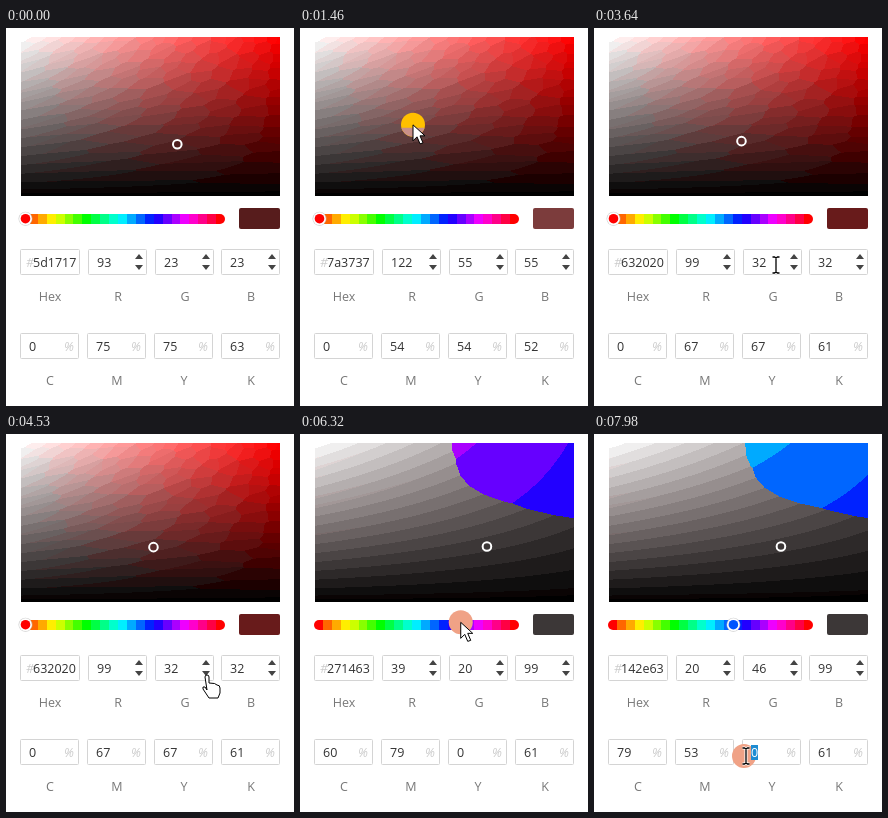
An HTML page with a canvas that plays this animation: 288x378 px, repeating every 8 s.

```html
<!DOCTYPE html>
<html lang="en">
<head>
<meta charset="utf-8">
<title>Colour picker</title>
<style>
html, body { margin: 0; width: 100%; height: 100%; overflow: hidden; background: #fff; }
canvas { position: absolute; left: 15px; top: 9px; }
svg { position: absolute; left: 0; top: 0; }
text { font: 12.5px "Open Sans", "Noto Sans", sans-serif; fill: #333; }
.label { fill: #777; text-anchor: middle; }
.unit { fill: #ccc; font-style: italic; }
</style>
</head>
<body>
<canvas id="area" width="259" height="159"></canvas>
<svg id="stage" width="288" height="378" viewBox="0 0 288 378"></svg>
<script>
(() => {
const LOOP = 8000, STEP = 70, BARS = 23;
const stage = document.getElementById('stage');
const ctx = document.getElementById('area').getContext('2d');

function set(el, attrs) {
  for (const k in attrs) el.setAttribute(k, attrs[k]);
}
function add(tag, attrs, parent = stage) {
  const el = document.createElementNS('http://www.w3.org/2000/svg', tag);
  set(el, attrs);
  parent.append(el);
  return el;
}
function label(x, y, str, cls = '') {
  const el = add('text', { x, y, class: cls });
  el.textContent = str;
  return el;
}
const css = c => `rgb(${c.map(Math.round)})`;
const show = (el, on) => set(el, { visibility: on ? 'visible' : 'hidden' });

// Colour with the given hue whose channels span lo..hi
function hueColor(h, lo = 0, hi = 255) {
  return [5, 3, 1].map(n => {
    const k = (n + h / 60) % 6;
    return hi - (hi - lo) * Math.max(0, Math.min(k, 4 - k, 1));
  });
}
function hueOf([r, g, b]) {
  const hi = Math.max(r, g, b), d = hi - Math.min(r, g, b) || 1;
  const h = hi === r ? (g - b) / d : hi === g ? 2 + (b - r) / d : 4 + (r - g) / d;
  return (h * 60 + 360) % 360;
}

// Limited palette: reds, warm greys and the strip colours; the last number weighs distance
let seed = 7;
const rand = () => (seed = seed * 16807 % 2147483647) / 2147483647;
const barColors = Array.from({ length: BARS }, (_, i) => hueColor(i && 8 + 16 * i));
const palette = [...barColors, [38, 236, 196]].map(c => [...c, 1]);
for (let r = 0; r <= 255; r += 15) {
  const warm = r - 8 * Math.sin(Math.PI * r / 255);
  palette.push([r, warm, warm, 1.44]);
  for (let g = 0; g < r; g += 15) {
    const v = Math.min(255, r + rand() * 10 - 5), w = Math.max(0, g + rand() * 10 - 5);
    palette.push([v, w, w, 1.44]);
  }
}

function nearest(r, g, b) {
  let best = null, min = Infinity;
  for (const p of palette) {
    const x = p[0] - r, y = p[1] - g, z = p[2] - b;
    const d = (x * x + y * y + z * z) * p[3];
    if (d < min) { min = d; best = p; }
  }
  return best;
}

let paintedHue = -1;
function paintArea(hue) {
  hue = Math.round(hue) % 360;
  if (hue === paintedHue) return;
  paintedHue = hue;
  const img = ctx.createImageData(259, 159), [r, g, b] = hueColor(hue);
  for (let y = 0, i = 0; y < 159; y++) {
    const v = 1 - y / 158;
    for (let x = 0; x < 259; x++, i += 4) {
      const s = x / 258, mix = c => (255 + (c - 255) * s) * v;
      const p = nearest(mix(r), mix(g), mix(b));
      img.data[i] = p[0];
      img.data[i + 1] = p[1];
      img.data[i + 2] = p[2];
      img.data[i + 3] = 255;
    }
  }
  ctx.putImageData(img, 0, 0);
}

// Static layout
const clip = add('clipPath', { id: 'strip' });
add('rect', { x: 14, y: 186, width: 205, height: 10, rx: 5 }, clip);
const strip = add('g', { 'clip-path': 'url(#strip)', 'shape-rendering': 'crispEdges' });
barColors.forEach((c, i) => {
  const width = 205 / BARS;
  add('rect', { x: 14 + i * width, y: 186, width, height: 10, fill: css(c) }, strip);
});
const swatch = add('rect', { x: 233, y: 180, width: 41, height: 21, rx: 2 });

const fieldX = [14, 82, 149, 215];
const values = [];
function field(x, y, width, name, textX) {
  add('rect', { x: x + .5, y: y + .5, width: width - 1, height: 25, rx: 1, fill: '#fff', stroke: '#d4d4d4' });
  label(x + 30, y + 52, name, 'label');
  values.push(label(textX, y + 18, ''));
}
['Hex', 'R', 'G', 'B'].forEach((name, i) => {
  const x = fieldX[i];
  field(x, 221, i ? 59 : 60, name, i ? x + 9 : 27);
  if (!i) return label(20, 239, '#', 'unit');
  add('path', { d: `M${x + 47} 231h8l-4-5zm0 6h8l-4 5z`, fill: '#444' });
});
['C', 'M', 'Y', 'K'].forEach((name, i) => {
  const x = 14 + 67 * i;
  field(x, 305, 59, name, x + 9);
  label(x + 44, 323, '%', 'unit');
});

// Moving parts
const ring = add('circle', { r: 4.3, fill: 'none', stroke: '#fff', 'stroke-width': 2 });
const thumb = add('g', {});
add('circle', { r: 7, fill: '#bbb', opacity: .7 }, thumb);
add('circle', { r: 6.4, fill: '#fff' }, thumb);
const thumbDot = add('circle', { r: 4.8 }, thumb);

const press = add('g', {});
const disc = add('circle', { r: 12 }, press);
const discLow = add('path', { d: 'M-11.6 3A12 12 0 0 0 11.6 3z', fill: '#c8908a' }, press);
const hot = add('rect', { x: -7, y: -7, width: 10, height: 10, fill: '#788888' }, press);
const selection = add('g', {});
add('rect', { x: 157, y: 311, width: 7, height: 15, fill: '#1e8cd2' }, selection);
add('text', { x: 157, y: 323, style: 'fill:#fff' }, selection).textContent = '0';

const outline = { fill: '#fff', stroke: '#000', 'stroke-linejoin': 'round' };
const pointer = add('g', {});
const beam = add('g', { fill: 'none' }, pointer);
for (const [stroke, width] of [['#fff', 3], ['#000', 1.3]]) {
  add('path', { d: 'M-3.5-8h2l1.5 1 1.5-1h2M0-7V7M-3.5 8h2l1.5-1 1.5 1h2', stroke, 'stroke-width': width }, beam);
}
const cursors = {
  arrow: add('path', { d: 'M0 0V16l4-4 3 7 3-1-3-7h5z', ...outline }, pointer),
  hand: add('path', { d: 'M-2 2q0-2 2-2t2 2v6q7 0 8 2 3 0 3 3v5l-2 5h-9l-6-9q-1-3 2-2l2 3z', ...outline }, pointer),
  beam
};

// Motion: cursor [time, x, y], dragged colour [time, red, green], button [down, up]
const path = [[130, 190, 306], [480, 171, 117], [900, 85, 66], [1880, 134, 120], [2090, 136, 214],
  [2300, 133, 229], [3520, 133, 229], [3630, 182, 237], [3850, 201, 241], [5620, 201, 241],
  [5910, 207, 190], [6600, 123, 187], [6850, 123, 187], [7150, 141.1, 187], [7450, 165, 362],
  [7970, 152, 322]];
const dragged = [[480, 93, 23], [900, 168, 86], [1880, 88, 32]];
const presses = [[480, 1880], [2480, 3530], [4500, 5640], [5960, 7150], [7960, LOOP]];

function at(keys, t) {
  const i = keys.findIndex(k => k[0] > t);
  if (i < 0) return keys[keys.length - 1].slice(1);
  if (!i) return keys[0].slice(1);
  const a = keys[i - 1], b = keys[i], f = (t - a[0]) / (b[0] - a[0]);
  return a.slice(1).map((v, j) => v + (b[j + 1] - v) * f);
}

// Steps of a held spinner: one at once, then repeating after a delay
function spin(t, start, most) {
  if (t < start) return 0;
  return Math.min(most, 1 + Math.max(0, Math.floor((t - start - 590) / 42)));
}

function cursorKind(x, y) {
  const upper = y > 221 && y < 247, lower = y > 305 && y < 331;
  const i = fieldX.findIndex(f => x >= f - 1 && x < f + 59);
  if (i < 0 || !(upper || lower)) return 'arrow';
  return upper && i && x > fieldX[i] + 44 ? 'hand' : 'beam';
}

function draw(t) {
  const [cx, cy] = at(path, t);
  const down = presses.some(([a, b]) => t >= a && t < b);
  const dragging = down && t < 2000, sliding = t >= 5960;

  const [red, green] = at(dragged, t).map(Math.round);
  let rgb = [red + spin(t, 2480, 11), green - spin(t, 4500, 12), green];
  let hue = hueOf(rgb), thumbX = 19.5 + 193 * hue / 360;
  if (sliding) {
    thumbX = at(path, Math.min(t, 7150))[0] - 1.7;
    hue = (thumbX - 14) / 205 * 360;
    rgb = hueColor(hue, 20, 99).map(Math.round);
  }
  const hi = Math.max(...rgb), lo = Math.min(...rgb);

  paintArea(hue);
  set(swatch, { fill: css(nearest(...rgb).slice(0, 3)) });

  const sat = (hi - lo) / (hi + lo), light = (hi + lo) / 510;
  let x = 15 + 259 * sat, y = 9 + 159 * (1 - light / (1 - sat / 2));
  if (dragging) { x = (x + cx) / 2; y = (y + cy) / 2; }
  set(ring, { cx: x, cy: y });
  set(thumb, { transform: `translate(${thumbX} 190.7)` });
  set(thumbDot, { fill: css(hueColor(hue)) });

  const hex = rgb.map(c => c.toString(16).padStart(2, '0')).join('');
  const cmy = rgb.map(c => Math.floor(100 * (1 - c / hi)));
  [hex, ...rgb, ...cmy, Math.floor(100 * (1 - hi / 255))]
    .forEach((v, i) => values[i].textContent = v);

  const kind = cursorKind(cx, cy), move = { transform: `translate(${cx} ${cy})` };
  set(press, move);
  set(pointer, move);
  for (const k in cursors) show(cursors[k], t >= 130 && k === kind);
  show(disc, down);
  set(disc, { fill: dragging ? '#ffc000' : '#f0a286', cx: kind === 'beam' ? -2 : 0 });
  show(discLow, dragging);
  show(hot, down && kind === 'hand');
  show(selection, t >= 7960);
}

function tick(now) {
  const t = now % LOOP;
  draw(Math.max(0, 60 + STEP * Math.floor((t - 60) / STEP)));
  requestAnimationFrame(tick);
}
requestAnimationFrame(tick);
})();
</script>
</body>
</html>
```
